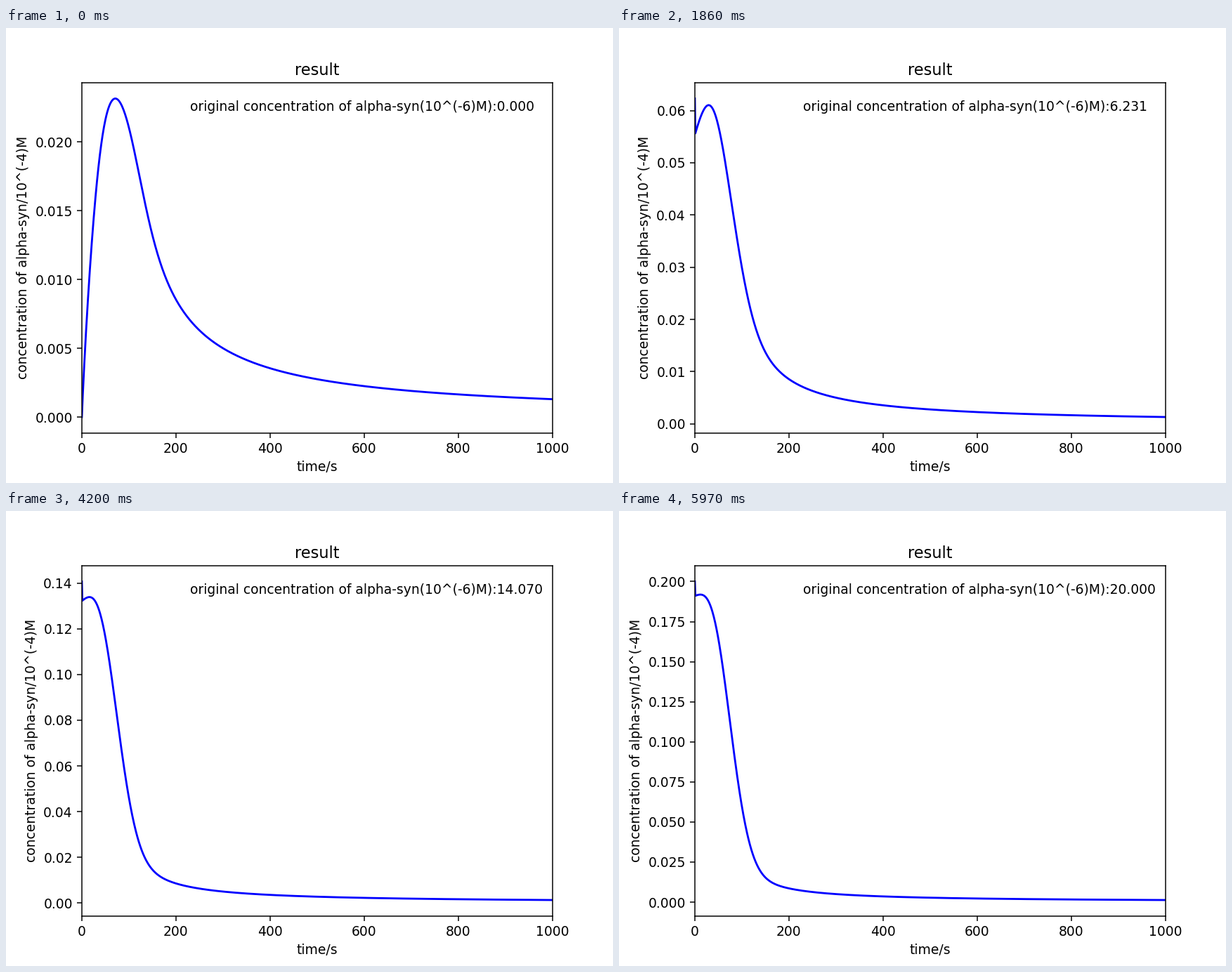
Write a matplotlib script that moves like this. It is 864x648 px and loops after 6000 ms.

```python
import numpy as np
import matplotlib.pyplot as plt
from matplotlib.animation import FuncAnimation

FRAMES = 200
INTERVAL = 30
DOSES = np.linspace(0, 20, FRAMES)      # initial concentration, 1e-6 M
TIME = np.arange(0, 1001)

SUPPLY = 9e-4                           # constant production
GROWTH, STAGE = 7.3e-4, 24.5            # clearance rises after two lag stages


def clearance(t):
    return GROWTH * (t - 2 * STAGE + (t + 2 * STAGE) * np.exp(-t / STAGE))


def uptake(t, c):
    """Saturable loss that builds up slowly, then fades out."""
    activity = (1 + t / 120) / (1 + (t / 78) ** 4)
    return activity * (3.45e-4 * c / (c + 0.003) + 6.3e-4 * c / (c + 0.085))


def rate(t, c):
    return SUPPLY - uptake(t, c) - clearance(t) * c


def simulate(start):
    """Integrate all doses together with fourth order Runge-Kutta."""
    c = start - 0.01034 * start / (start + 0.0298)   # fast initial binding
    rows = [start]
    for t in TIME[:-1]:
        k1 = rate(t, c)
        k2 = rate(t + 0.5, c + 0.5 * k1)
        k3 = rate(t + 0.5, c + 0.5 * k2)
        k4 = rate(t + 1, c + k3)
        c = c + (k1 + 2 * k2 + 2 * k3 + k4) / 6
        rows.append(c)
    return np.array(rows).T


curves = simulate(DOSES / 100)

fig, ax = plt.subplots(figsize=(6.4, 4.8), dpi=135)
ax.set_title("result")
ax.set_xlabel("time/s")
ax.set_ylabel("concentration of alpha-syn/10^(-4)M")
line, = ax.plot(TIME, curves[0], color="blue", lw=1.5)
ax.set_xlim(0, 1000)
label = ax.text(0.23, 0.92, "", transform=ax.transAxes)


def update(i):
    y = curves[i]
    line.set_ydata(y)
    pad = 0.05 * (y.max() - y.min())
    ax.set_ylim(y.min() - pad, y.max() + pad)
    label.set_text(f"original concentration of alpha-syn(10^(-6)M):{DOSES[i]:.3f}")
    return line, label


anim = FuncAnimation(fig, update, frames=FRAMES, interval=INTERVAL,
                     repeat=True, repeat_delay=0, blit=False)
plt.show()
```
